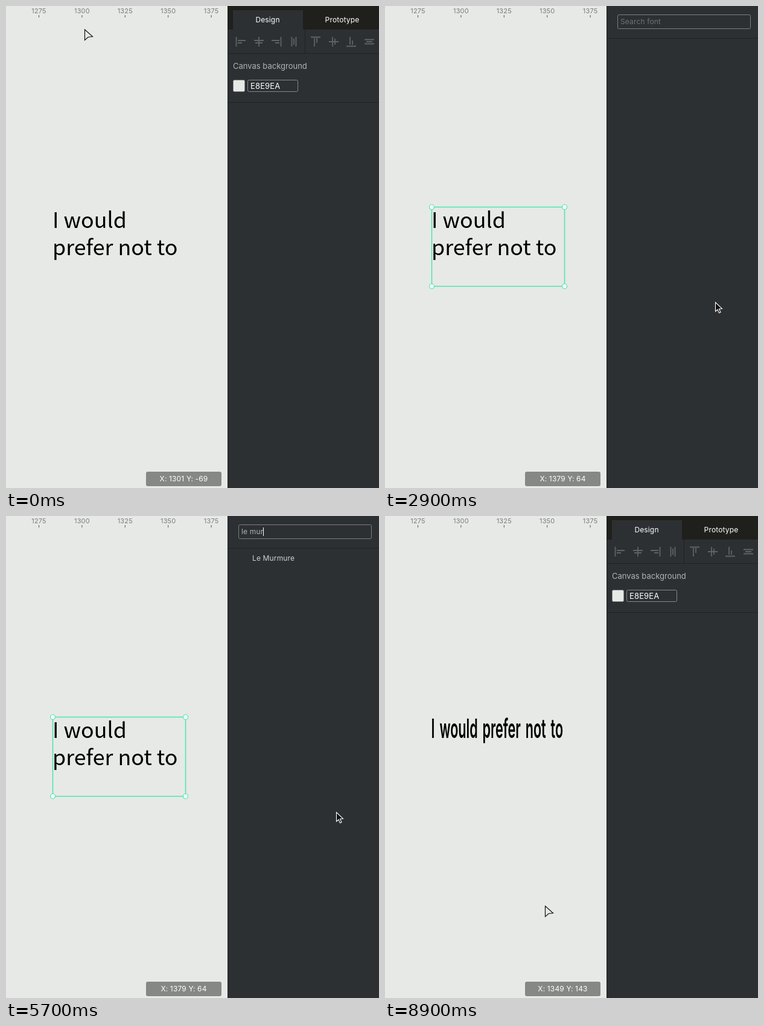
An HTML page that plays this animation: 618 by 797 pixels, repeating every 9.4 s.

```html
<!DOCTYPE html>
<html lang="en">
<head>
<meta charset="utf-8">
<title>Choosing a font</title>
<style>
html, body { margin: 0; height: 100%; overflow: hidden; background: #e7e9e6; }
svg { display: block; width: 100vw; height: 100vh; }
text { font: 12px "Work Sans", Inter, sans-serif; letter-spacing: .15px; fill: #fff; white-space: pre; }
path { fill: none; }
.mid { text-anchor: middle; }
.head { font-size: 13px; letter-spacing: 0; fill: #b1b2b5; }
.label { font-size: 11px; fill: #b1b2b5; }
.unit { fill: #8f9296; }
.tick { font-size: 11px; fill: #7b7d7b; }
.item { fill: #cfd1d3; }
.on { fill: #49e6ab; }
.bold { font-weight: 600; fill: #7b7e82; }
.glyph { font-size: 14px; fill: #7b7e82; }
.rule { stroke: #1f2122; }
.under { stroke: #74777a; }
.icon { stroke: #7b7e82; stroke-width: 1.5; }
.dim { stroke: #5f6266; stroke-width: 1.8; }
.sign { stroke: #c4c6c8; stroke-width: 1.2; }
.green { stroke: #49e6ab; stroke-width: 1.6; }
.check { stroke: #49e6ab; stroke-width: 1.2; }
.sans text { font: 35.8px "Noto Sans CJK JP", "Noto Sans CJK SC", "Noto Sans CJK", "Noto Sans", sans-serif; letter-spacing: 0; fill: #000; }
.narrow { font: 600 44px Inter, sans-serif; letter-spacing: 0; word-spacing: 5px; fill: #000; }
</style>
</head>
<body>
<svg id="stage" viewBox="0 0 618 797"></svg>
<script>
const LOOP = 9400, STEP = 100;
const text = (x, y, s, cls = '') => `<text x="${x}" y="${y}" class="${cls}">${s}</text>`;
const path = (cls, d) => `<path class="${cls}" d="${d}"/>`;
const rect = (x, y, w, h, attrs) => `<rect x="${x}" y="${y}" width="${w}" height="${h}" ${attrs}/>`;
const rules = (...ys) => path('rule', ys.map(y => `M368 ${y}.5H618`).join(''));
const under = (x1, x2, y) => path('under', `M${x1} ${y}.5H${x2}`);
const chevron = (x, y) => path('sign', `M${x - 5} ${y - 2.5}l5 5 5-5`);
const plus = y => path('sign', `M598.5 ${y}.5h11m-5.5-5.5v11`);
const section = (y, name) => text(376, y, name, 'head') + plus(y - 5);
const field = (x, y, value, unit, unitX) =>
  text(x + 5, y, value) + text(unitX, y, unit, 'unit') + under(x, x + 66, y + 7);
const lock = (x, y) => path('sign', `M${x - 4.5} ${y - 1}h9v7h-9zM${x - 2.5} ${y - 1}v-3q0-2.5 2.5-2.5t2.5 2.5M${x} ${y + 1.5}v2`);
const bars = (x, y, rows) => path('icon', rows.map(([from, to], i) =>
  `M${x + from} ${y - 6 + i * 4}H${x + to}`).join(''));

const ruler = [0, 1, 2, 3, 4].map(i => {
  const x = 54.5 + i * 71.4;
  return text(x, 12, 1275 + i * 25, 'tick mid') + `<path stroke="#555" d="M${x} 15v4"/>`;
}).join('');

const corners = [[77.5, 332.5], [297.5, 332.5], [77.5, 463.5], [297.5, 463.5]];
const frame = width => rect(77.5, 332.5, 220, 131, `fill="none" stroke="#49e6b0" stroke-width="${width}"`);
const handles = corners.map(([x, y]) =>
  `<circle cx="${x}" cy="${y}" r="4" fill="#fff" stroke="#49e6ab" stroke-width="1.2"/>`).join('');

const tabs = rect(368, 0, 250, 39, 'fill="#1f1f1c"') + rect(376, 7, 116, 33, 'fill="#2d3033"')
  + text(433.5, 27, 'Design', 'mid') + text(557, 27, 'Prototype', 'mid')
  + path('dim', 'M381.5 51v16M384 57h13M384 61h7M419 51v16M411 57h16M413 61h12'
    + 'M455.5 51v16M440 57h13M446 61h7M473.5 51v16M477 54v10M480.5 51v16'
    + 'M505 51.5h16M511 53v14M515 53v8M535 59h16M541 51v16M545 54v10'
    + 'M564 66.5h16M570 51v13M574 57v7M594 55.5h16M597 59h10M594 62.5h16')
  + path('rule', 'M495.5 39V78') + rules(78);

const page = text(376, 104, 'Canvas background', 'head')
  + rect(376.5, 122.5, 19, 19, 'rx="2" fill="#e7e9e6" stroke="#86898c"')
  + rect(400.5, 122.5, 83, 19, 'rx="2" fill="none" stroke="#86898c"')
  + '<text x="405" y="137" style="font-size:13px">E8E9EA</text>' + rules(159);

const props = text(376, 111, 'Size', 'label') + field(444, 111, 77, 'W', 496) + field(519, 111, 46, 'H', 573)
  + text(376, 147, 'Position', 'label') + field(444, 147, 1283, 'X', 499) + field(519, 147, 34, 'Y', 575)
  + text(376, 183, 'Rotation', 'label') + field(444, 183, 0, 'dg', 493) + lock(603, 106)
  + text(376, 237, 'Layer', 'head') + text(385, 270, 'Normal') + chevron(466, 266) + under(380, 475, 277)
  + field(484, 270, 100, '%', 537) + lock(600, 266)
  + path('sign', 'M564.5 266q5.5-7 11 0q-5.5 7-11 0z') + '<circle cx="570" cy="266" r="2.2" fill="#c4c6c8"/>'
  + section(326, 'Fill') + section(372, 'Shadow') + section(418, 'Blur')
  + section(464, '<tspan fill="#e6e7e8">Text</tspan>') + section(761, 'Export')
  + rules(211, 298, 344, 390, 437, 734, 780)
  + text(385, 500, 'Source Sans Pro') + chevron(601, 496) + under(380, 611, 509)
  + text(385, 538, 14) + chevron(477, 534) + under(380, 486, 546)
  + text(504, 538, 'regular') + chevron(601, 534) + under(500, 610, 546)
  + path('icon', 'M379 567v10m-2-8l2-2 2 2m-4 6l2 2 2-2M383 568h8M383 572h8M383 576h8'
    + 'M441 577h12m-10-2l-2 2 2 2m8-4l2 2-2 2')
  + text(447, 573, 'AV', 'unit mid') + text(399, 576, 1.2) + under(394, 427, 583)
  + text(463, 576, 0) + under(459, 490, 583)
  + '<text x="545" y="576" class="bold mid" style="font-size:10px">AA</text>'
  + text(573, 576, 'aa', 'bold mid') + text(601, 576, 'Aa', 'bold mid')
  + bars(390, 620, [[-7, 7], [-7, 3], [-7, 7], [-7, 2]]) + bars(419, 620, [[-7, 7], [-4, 4], [-7, 7], [-4, 4]])
  + bars(448, 620, [[-7, 7], [-3, 7], [-7, 7], [-2, 7]]) + bars(477, 620, [[-7, 7], [-7, 7], [-7, 7], [-7, 7]])
  + path('green', 'M510 572h14M383 660h14M539 614h12M545 627v-10m-3 3l3-3 3 3'
    + 'M386 695h8v10h-8zM384 693h3v3h-3zM393 693h3v3h-3zM384 704h3v3h-3zM393 704h3v3h-3z')
  + path('icon', 'M567 620h12M573 613v5m-2-2l2 2 2-2M573 627v-5m-2 2l2-2 2 2'
    + 'M595 627h12M601 613v10m-3-3l3 3 3-3'
    + 'M430 654v5q0 4 4 4t4-4v-5M428 667h12M471 660h14'
    + 'M482 656q-1-2-4-2-4 0-4 3 0 2 4 3t4 3q0 3-4 3-3 0-4.5-2')
  + text(574, 665, '¶', 'glyph mid') + text(600, 665, '¶', 'glyph mid')
  + '<path style="fill:#7b7e82" d="M566 657l3 3-3 3zM609 657l-3 3 3 3z"/>'
  + '<text x="390" y="703" class="on mid" style="font-size:8px">A</text>'
  + '<text x="434" y="703" class="bold mid" style="font-size:8px">A</text>'
  + '<text x="479" y="703" class="bold mid" style="font-size:8px">A</text>'
  + '<path class="icon" stroke-dasharray="2 1.5" d="M427 705h14M474 694v13"/>';

const nearby = ('Smythe,Sniglet,Snippet,Snowburst One,Sofadi One,Sofia,Solway,Song Myung,Sonsie One,'
  + 'Sorts Mill Goudy,Source Code Pro,Source Sans Pro,Source Sans Pro,Source Serif Pro,Space Mono,Spartan,'
  + 'Special Elite,Spectral,Spectral SC,Spicy Rice,Spinnaker,Spirax,Squada One').split(',');
const fonts = ('Alegreya,Alegreya SC,Alegreya Sans,Alegreya Sans SC,Aleo,Alex Brush,Allerta,Allerta Stencil,'
  + 'Annie Use Your Telescope,Dynalight,Eagle Lake,Glegoo,Le Murmure,League Script,Leckerli One,Ledger,Lekton,'
  + 'Lemon,Lemonada,Oleo Script,Oleo Script Swash Caps,Rum Raisin,Single Day,Stalemate,Titan One,'
  + 'Uncial Antiqua,Valera Round,Wellfleet').split(',').concat(nearby).sort();

const row = (name, y, chosen, width) => (chosen
  ? rect(368, y - 16, width, 32, '') + path('check', `M388.5 ${y + 0.5}l3 3 6.5-7`) : '')
  + text(408, y + 4, name, chosen ? 'on' : 'item');

function rows(t, query) {
  if (t < 3000) return '';
  if (!query) return nearby.map((name, i) => row(name, 75 + 32 * i, i === 11, 247)).join('')
    + rect(615, 705, 3, 17, 'fill="#c4c6c8"');
  return fonts.filter(name => name.toLowerCase().includes(query)).slice(0, 23)
    .map((name, i) => row(name, 70 + 32 * i, t >= 6600, 250)).join('');
}

const stage = document.getElementById('stage');
stage.innerHTML = rect(0, 0, 618, 797, 'fill="#e7e9e6"') + ruler
  + '<g id="sans" class="sans">' + text(77, 367, 'I would') + text(77, 412, 'prefer not to') + '</g>'
  + '<text id="narrow" class="narrow" transform="translate(76.6 367) scale(.49 1)">I would prefer not to</text>'
  + `<g id="outline">${frame(1)}</g><g id="selection">${frame(1.5)}${handles}</g>`
  + rect(232, 770, 125, 24, 'rx="3" fill="#868885"') + '<text id="coords" class="mid" x="294.5" y="786"></text>'
  + rect(367, 0, 251, 797, 'fill="#2d3033"') + path('rule', 'M367.5 0V797')
  + `<g id="design">${tabs}<g id="page">${page}</g><g id="props">${props}</g></g>`
  + '<g id="list">' + rect(385.5, 14.5, 220, 23, 'rx="2" fill="none" stroke="#7b7e82"') + rules(53)
  + '<text id="query" x="390" y="30"></text><path id="caret" stroke="#fff" d="M.5 19v14"/><g id="rows"></g></g>'
  + rect(380.5, 483.5, 230, 26, 'id="hover" fill="none" stroke="#86898c"')
  + '<g id="cursor"><path id="arrow" stroke="#111" stroke-width="1.2" d="M.5 1L13.5 12.5 6 13.5.5 18.5z"/>'
  + '<path id="pointer" style="fill:#111" stroke="#fff" stroke-width="1.1" d="M.5 1V16L4 13 6.5 18.5 9 17.5 6.5 12 11.5 11.5z"/>'
  + '<path id="hand" style="fill:#fff" d="M0 1c2-2 3.5 0 4 2l1 3 6 1.5c2 .5 2 2 1.8 4L12 17H4L-2 11c-2-2 0-3.5 2-2.5L2 9z"/></g>';

const el = id => document.getElementById(id);
const show = (id, visible) => { el(id).style.display = visible ? '' : 'none'; };

// Pointer path: time, x, y
const route = [[0, 130, 38], [400, 130, 38], [600, 138, 110], [900, 173, 336], [1000, 173, 352], [1200, 173, 362],
  [2000, 173, 362], [2400, 547, 489], [8200, 547, 489], [8600, 265, 643], [8800, 265, 643], [8900, 265, 644],
  [LOOP, 265, 644]];
const typed = [[4500, 'l'], [4600, 'le'], [5200, 'le '], [5300, 'le m'], [5500, 'le mu'], [5700, 'le mur']];

function pointerAt(t) {
  const i = route.findIndex(([end]) => end > t);
  const [t0, x0, y0] = route[i - 1], [t1, x1, y1] = route[i];
  const k = (t - t0) / (t1 - t0);
  return [x0 + (x1 - x0) * k, y0 + (y1 - y0) * k];
}

function draw(t) {
  const within = (from, to) => t >= from && t < to;
  const [x, y] = pointerAt(t);
  const listed = within(2900, 8600);
  const hand = within(2400, 2900) || within(4300, 5300);
  const query = typed.reduce((last, [at, s]) => t >= at ? s : last, '');

  show('sans', t < 6800);
  show('narrow', t >= 6800);
  show('outline', within(900, 1400));
  show('selection', within(1400, 8600));
  show('design', !listed);
  show('page', !within(1500, 8600));
  show('props', within(1500, 2900));
  show('hover', within(2400, 2900));
  show('list', listed);
  if (listed) {
    el('query').textContent = query || 'Search font';
    el('query').style.fill = query ? '#b1b2b5' : '#6f7276';
    el('rows').innerHTML = rows(t, query);
    show('caret', within(4500, 6300) || within(7000, 7700) || t >= 8100);
    el('caret').setAttribute('transform', `translate(${Math.round(390 + el('query').getComputedTextLength())})`);
  }
  el('coords').textContent = x > 351 ? 'X: 1379 Y: 64'
    : `X: ${Math.round(1275 + (x - 54.5) / 2.857)} Y: ${Math.round(34 + (y - 332.5) / 2.857)}`;
  el('cursor').setAttribute('transform', `translate(${x} ${y})`);
  show('arrow', x < 367);
  show('pointer', x >= 367 && !hand);
  show('hand', x >= 367 && hand);
}

let shown = -1;
function tick() {
  const t = Math.floor(performance.now() % LOOP / STEP) * STEP;
  if (t !== shown) draw(shown = t);
  requestAnimationFrame(tick);
}
tick();
</script>
</body>
</html>
```
